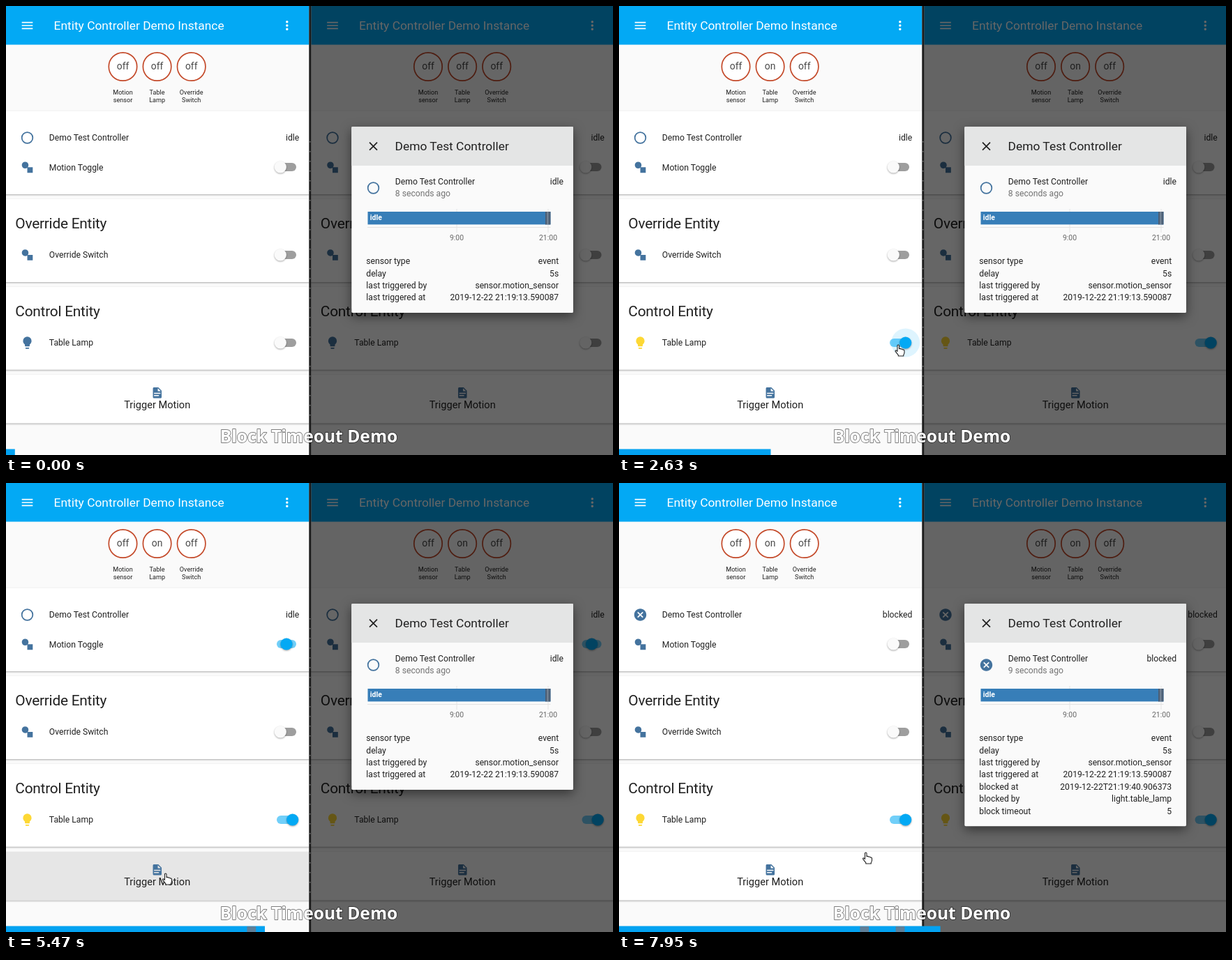
These frames come from a looping animation (870x644 px, 8 s). An HTML page:

```html
<!DOCTYPE html>
<html lang="en">
<head>
<meta charset="utf-8">
<title>Block Timeout Demo</title>
<style>
html, body { margin: 0; width: 100%; height: 100%; overflow: hidden; background: #fafafa; }
svg { display: block; width: 870px; height: 644px; }
text { font-family: Roboto, "Noto Sans", sans-serif; font-size: 12.18px; fill: #212121; white-space: pre; }
.card { fill: #fff; filter: drop-shadow(0 1.6px 1px rgba(0,0,0,.33)); }
.knob { filter: drop-shadow(0 1px 1px rgba(0,0,0,.35)); }
.dialog { filter: drop-shadow(0 5px 8px rgba(0,0,0,.5)); }
.caption { font: 700 24.6px "Open Sans", "Noto Sans", sans-serif; fill: #fff;
  stroke: rgba(0,0,0,.5); stroke-width: 1.8px; paint-order: stroke; stroke-linejoin: round; }
</style>
</head>
<body>
<svg id="stage" viewBox="0 0 870 644"></svg>
<script>
const LOOP = 8000, FRAMES = 68, BLUE = '#44739e', ACCENT = '#03a9f4';

const STEPS = [0, 740, 860, 970, 1080, 1190, 1300, 1420, 1530, 1640, 1740, 2070,
  2210, 2290, 2400, 2510, 2630, 3480, 3590, 3700, 3810, 3930, 4030, 4140, 4250, 4370,
  5230, 5350, 5460, 5570, 5780, 5900, 6010, 6540, 6660, 7950];

// pointer path: step, x, y
const PATH = [[1, 648, 632], [8, 398, 502], [10, 400.5, 486], [16, 400.5, 486],
  [17, 380, 479], [18, 348, 476], [20, 276, 496], [22, 246, 532], [24, 230, 560],
  [25, 229, 560], [34, 229, 560], [35, 354, 530]];

const ICONS = {
  idle: 'M12,20A8,8 0 0,1 4,12A8,8 0 0,1 12,4A8,8 0 0,1 20,12A8,8 0 0,1 12,20M12,2A10,10 0 0,0 2,12A10,10 0 0,0 12,22A10,10 0 0,0 22,12A10,10 0 0,0 12,2Z',
  blocked: 'M12,2C17.53,2 22,6.47 22,12C22,17.53 17.53,22 12,22C6.47,22 2,17.53 2,12C2,6.47 6.47,2 12,2M15.59,7L12,10.59L8.41,7L7,8.41L10.59,12L7,15.59L8.41,17L12,13.41L15.59,17L17,15.59L13.41,12L17,8.41L15.59,7Z',
  shapes: 'M8.5,3A5.5,5.5 0 0,1 14,8.5C14,9.83 13.53,11.05 12.74,12H21V21H12V12.74C11.05,13.53 9.83,14 8.5,14A5.5,5.5 0 0,1 3,8.5A5.5,5.5 0 0,1 8.5,3Z',
  bulb: 'M12,2A7,7 0 0,0 5,9C5,11.38 6.19,13.47 8,14.74V17A1,1 0 0,0 9,18H15A1,1 0 0,0 16,17V14.74C17.81,13.47 19,11.38 19,9A7,7 0 0,0 12,2M9,21A1,1 0 0,0 10,22H14A1,1 0 0,0 15,21V20H9V21Z',
  file: 'M13,9H18.5L13,3.5V9M6,2H14L20,8V20A2,2 0 0,1 18,22H6C4.89,22 4,21.1 4,20V4C4,2.89 4.89,2 6,2M15,18V16H6V18H15M18,14V12H6V14H18Z',
  menu: 'M3,6H21V8H3V6M3,11H21V13H3V11M3,16H21V18H3V16Z',
  dots: 'M12,16A2,2 0 1,1 12,20A2,2 0 1,1 12,16M12,10A2,2 0 1,1 12,14A2,2 0 1,1 12,10M12,4A2,2 0 1,1 12,8A2,2 0 1,1 12,4Z',
  close: 'M19,6.41L17.59,5L12,10.59L6.41,5L5,6.41L10.59,12L5,17.59L6.41,19L12,13.41L17.59,19L19,17.59L13.41,12L19,6.41Z'
};
const HAND = 'M-1.5,1.2Q-1.5,0 -.3,0Q1,0 1,1.2V5.6Q3.1,5 3.5,6.1Q5.5,5.6 6,6.9Q8.5,6.6 8.5,8.6V11.5Q8.2,13.4 7.3,14.3V16H-.2V14.6Q-2,12.5 -4.3,9.4Q-4.8,7.8 -3.3,7.8L-1.5,9.3Z';
const ARROW = 'M0,0V15L3.5,11.8L5.9,17L8,16L5.7,11H10.5Z';

const text = (x, y, s, more = '') => `<text x="${x}" y="${y}" ${more}>${s}</text>`;
const rect = (x, y, w, h, fill, more = '') =>
  `<rect x="${x}" y="${y}" width="${w}" height="${h}" fill="${fill}" ${more}/>`;
const circle = (x, y, r, fill, more = '') =>
  `<circle cx="${x}" cy="${y}" r="${r}" fill="${fill}" ${more}/>`;
const icon = (name, x, y, fill = BLUE, k = .87) =>
  `<path fill="${fill}" fill-rule="evenodd" transform="translate(${x} ${y}) scale(${k}) translate(-12 -12)" d="${ICONS[name]}"/>`;
const END = 'text-anchor="end"', MID = 'text-anchor="middle"';

function toggle(y, pos, halo = '') {
  const on = pos > .4;
  return rect(388, y - 6, 28, 12, on ? ACCENT : '#000', `rx="6" opacity="${on ? .56 : .38}"`) + halo +
    circle(393.3 + 17.4 * pos, y, 8.6, on ? ACCENT : '#fafafa', 'class="knob"');
}

function badge(x, on, a, b) {
  const small = `${MID} style="font-size:9.1px"`;
  return circle(x, 87, 20.2, '#fff', 'stroke="#c44a2a" stroke-width="1.7"') +
    text(x, 91.3, on ? 'on' : 'off', `${MID} style="font-size:13.9px;fill:#4a4a4a"`) +
    text(x, 126.8, a, small) + text(x, 137.6, b, small);
}

const card = (y, h) => `<rect class="card" x="-2" y="${y}" width="438" height="${h}"/>`;
const heading = (y, s) => text(13.3, y, s, 'style="font-size:20.88px;letter-spacing:-.012em"');
const row = (y, name, s, fill) => icon(name, 30.5, y, fill) + text(61.8, y + 4.3, s);

function panel(s, press = '') {
  return rect(0, 0, 436, 644, '#fafafa') + rect(0, 0, 436, 55.5, ACCENT) +
    icon('menu', 30.5, 28, '#fff') + icon('dots', 402.8, 28, '#fff') +
    text(68.5, 34.2, 'Entity Controller Demo Instance', 'style="font-size:17.4px;fill:#fff"') +
    badge(167.5, s.sensor, 'Motion', 'sensor') +
    badge(216.6, s.lamp, 'Table', 'Lamp') +
    badge(265.7, false, 'Override', 'Switch') +
    card(150.5, 119.5) + card(277, 119) + card(403, 118.7) + card(529, 69.5) + press +
    row(189, s.state, 'Demo Test Controller') + text(420.3, 193.3, s.state, END) +
    row(231.3, 'shapes', 'Motion Toggle') + toggle(231, s.motion) +
    heading(318.5, 'Override Entity') +
    row(357, 'shapes', 'Override Switch') + toggle(357, 0) +
    heading(444.5, 'Control Entity') +
    row(483, 'bulb', 'Table Lamp', s.lamp ? '#fdd835' : BLUE) + toggle(483, s.power, s.halo) +
    icon('file', 216.8, 554.8, BLUE, .78) +
    text(216.7, 577.3, 'Trigger Motion', `${MID} style="font-size:14.6px"`);
}

function dialog(state) {
  const blocked = state === 'blocked';
  const info = [['sensor type', 'event'], ['delay', '5s'],
    ['last triggered by', 'sensor.motion_sensor'],
    ['last triggered at', '2019-12-22 21:19:13.590087']];
  if (blocked) info.push(['blocked at', '2019-12-22T21:19:40.906373'],
    ['blocked by', 'light.table_lamp'], ['block timeout', '5']);
  const tick = 'style="font-size:10.44px;fill:#666" ' + MID;
  let out = rect(495.3, 173.3, 317.7, blocked ? 319 : 266.8, '#fafafa', 'rx="1.7" class="dialog"') +
    rect(495.3, 173.3, 317.7, 55.7, '#e4e5e5') +
    icon('close', 526.5, 201.2, '#212121') +
    text(557.6, 207.4, 'Demo Test Controller', 'style="font-size:17.4px"') +
    icon(state, 526.5, 261) +
    text(557.8, 256.2, 'Demo Test Controller') + text(799, 256.2, state, END) +
    text(557.8, 273.4, `${blocked ? 9 : 8} seconds ago`, 'style="fill:#727272"') +
    rect(518, 317, 262.5, 1, '#e3e3e3') + rect(645.5, 291, 1, 34, '#e3e3e3') + rect(776.5, 291, 1, 34, '#e3e3e3') +
    rect(518.5, 295, 262, 18.4, '#377eb8') + rect(773, 295, 7.5, 18.4, '#5b6f86');
  for (let i = 0; i < 3; i++) out += rect(773.4 + i * 2.5, 295, .9, 18.4, i % 2 ? '#8a949e' : '#3f5166');
  out += text(521.8, 307.2, 'idle', 'style="font-size:10.44px;font-weight:700;fill:#fff"') +
    text(646, 335.8, '9:00', tick) + text(777, 335.8, '21:00', tick);
  info.forEach(([k, v], i) => {
    const y = 370.2 + i * 17.4;
    out += text(516.3, y, k) + text(792.2, y, v, END);
  });
  return out;
}

function pointer(n) {
  if (n < 1) return '';
  const i = PATH.findIndex(p => p[0] >= n), b = PATH[i], a = PATH[i - 1] || b;
  const t = b === a ? 0 : (n - a[0]) / (b[0] - a[0]);
  const x = a[1] + (b[1] - a[1]) * t, y = a[2] + (b[2] - a[2]) * t;
  const shape = x < 434 && y < 598 ? HAND : ARROW;
  let out = `<path transform="translate(${x} ${y})" d="${shape}" fill="#fff" stroke="#222" stroke-width="1.1" stroke-linejoin="round"/>`;
  if (n === 11 || n === 26) out += circle(x, y + 1, 10, '#f6f03a', 'style="mix-blend-mode:multiply"');
  return out;
}

// grey touch ripple on the trigger button
function press(n) {
  if (n === 26 || n === 27)
    return circle(227.5, 562, n === 26 ? 136 : 205, n === 26 ? '#f1f1f1' : '#ebebeb', 'clip-path="url(#button)"');
  const fill = { 28: '#e6e6e6', 29: '#e2e2e2', 30: '#e2e2e2', 31: '#f0f0f0' }[n];
  return fill ? rect(0, 529, 434, 69.5, fill) : '';
}

function halo(n) {
  if (n === 11) return circle(393.3, 483, 14, '#d2d2d2');
  if (n === 12) return circle(393.3, 483, 20.5, '#d9d9d9') + circle(393.3, 483, 14.5, '#c6c6c6');
  if (n >= 13 && n < 26) return circle(n === 13 ? 402 : 410.7, 483, 20.5, ACCENT, 'opacity=".13"');
  return '';
}

const ramp = (n, up) => n < up ? 0 : n === up ? .5 : 1;

function draw(n) {
  const s = {
    state: n >= 30 ? 'blocked' : 'idle',
    sensor: n >= 30 && n < 33,
    lamp: n >= 15,
    motion: ramp(n, 28) - ramp(n, 33),
  };
  const left = { ...s, power: ramp(n, 13), halo: halo(n) };
  const right = { ...s, power: ramp(n, 15), halo: '' };
  const unit = 870 / FRAMES;
  let bar = rect(0, 635.5, unit * (n + 1), 8.5, '#03a2f1');
  for (const mark of [27, 31])
    if (n >= mark) bar += rect(unit * mark, 636, unit, 8, '#5f7f98');
  return '<clipPath id="button"><rect y="529" width="434" height="69.5"/></clipPath>' +
    `<g transform="translate(437.5 0)">${panel(right)}</g>` +
    rect(437, 0, 433, 644, '#000', 'opacity=".6"') + dialog(s.state) +
    `<svg width="434.3" height="644">${panel(left, press(n))}</svg>` +
    rect(434.3, 0, 2.9, 644, '#1c1c1c') +
    '<path d="M435.6 194V600" stroke="#777" stroke-width="1.6" stroke-dasharray="1.5 12.5"/>' +
    pointer(n) + text(434, 626.4, 'Block Timeout Demo', `class="caption" ${MID}`) + bar;
}

const stage = document.getElementById('stage');
let shown = -1;
function tick() {
  const t = performance.now() % LOOP;
  const n = STEPS.filter(s => s <= t).length - 1;
  if (n !== shown) stage.innerHTML = draw(shown = n);
  requestAnimationFrame(tick);
}
tick();
</script>
</body>
</html>
```
